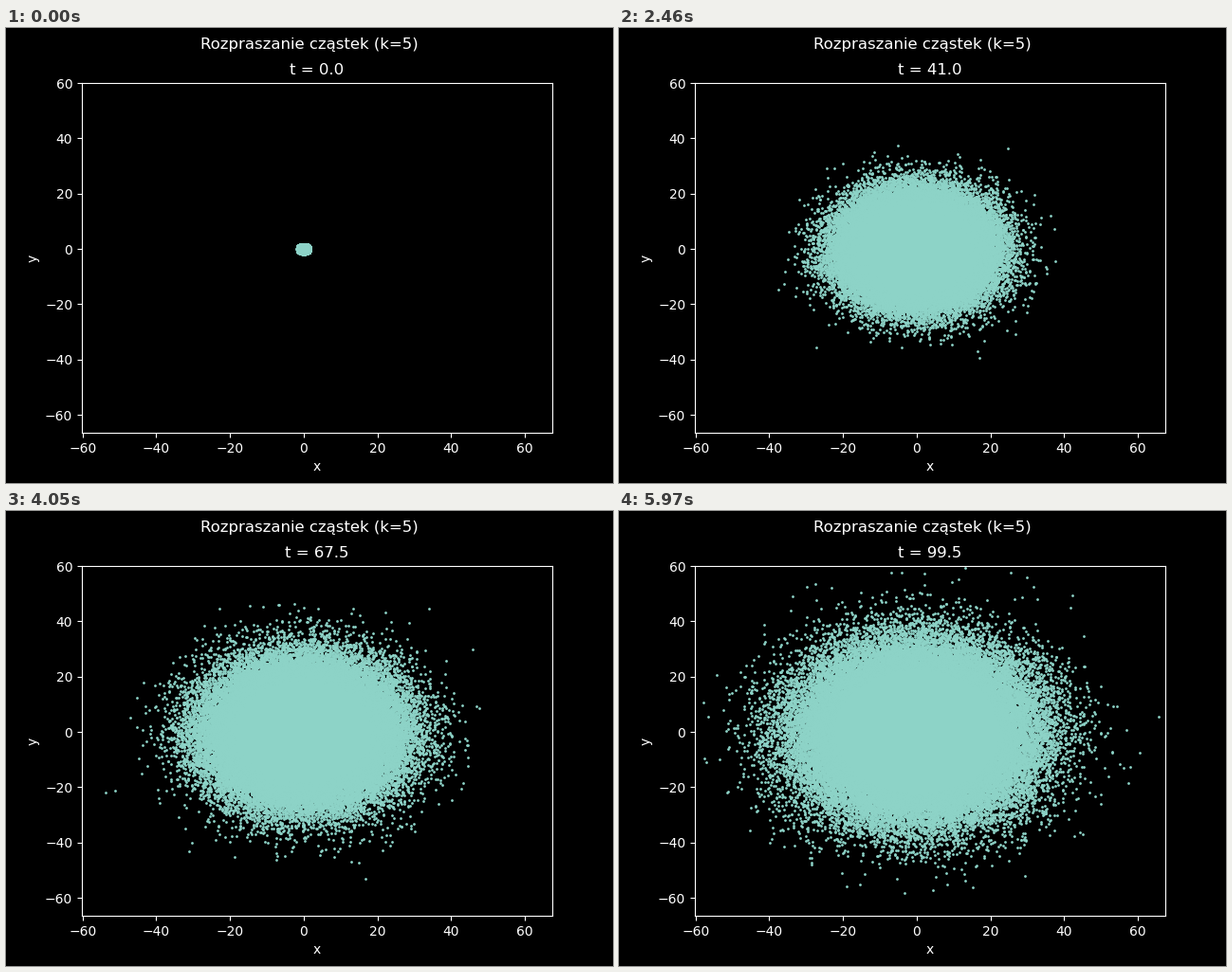
Animation of 640x480 px, one loop 6 s. Source, as a matplotlib script:

```python
import numpy as np
import matplotlib.pyplot as plt
from matplotlib.animation import FuncAnimation
from matplotlib.patches import Circle

N = 100_000        # particles
FRAMES = 200
DT = 0.5
R0 = 1.9           # radius of the starting disc
STEP = 0.99        # standard deviation of one step
CORE = 1.6         # solid core radius in standard deviations
COLOR = "#8dd3c7"
TITLE_SIZE = 11.87


def diffuse(seed=5):
    """Gaussian walk from a small disc; keep the points outside the solid core."""
    rng = np.random.default_rng(seed)
    r = R0 * np.sqrt(rng.random(N))
    a = 2 * np.pi * rng.random(N)
    pos = np.array([r * np.cos(a), r * np.sin(a)], dtype=np.float32)
    clouds = []
    for i in range(FRAMES):
        core = CORE * STEP * np.sqrt(i)
        # points just inside the rim hide its edge
        clouds.append((core, pos[:, np.hypot(*pos) >= core - 1]))
        pos = pos + np.float32(STEP) * rng.standard_normal(pos.shape, dtype=np.float32)
    return clouds


clouds = diffuse()

plt.style.use("dark_background")
fig, ax = plt.subplots(figsize=(6.4, 4.8), dpi=100)
fig.suptitle("Rozpraszanie cząstek (k=5)", fontsize=TITLE_SIZE)
ax.set(xlim=(-60.19, 67.46), ylim=(-66.55, 60.15), xlabel="x", ylabel="y")
title = ax.set_title("t = 0.0", fontsize=TITLE_SIZE)
disc = ax.add_patch(Circle((0, 0), 0, color=COLOR, lw=0))
dots, = ax.plot([], [], "o", ms=1, color=COLOR)


def update(i):
    core, pts = clouds[i]
    disc.set_radius(core)
    dots.set_data(*pts)
    title.set_text(f"t = {i * DT:.1f}")
    return disc, dots, title


anim = FuncAnimation(fig, update, frames=FRAMES, interval=30,
                     repeat=True, repeat_delay=0, blit=False)

plt.show()
```
